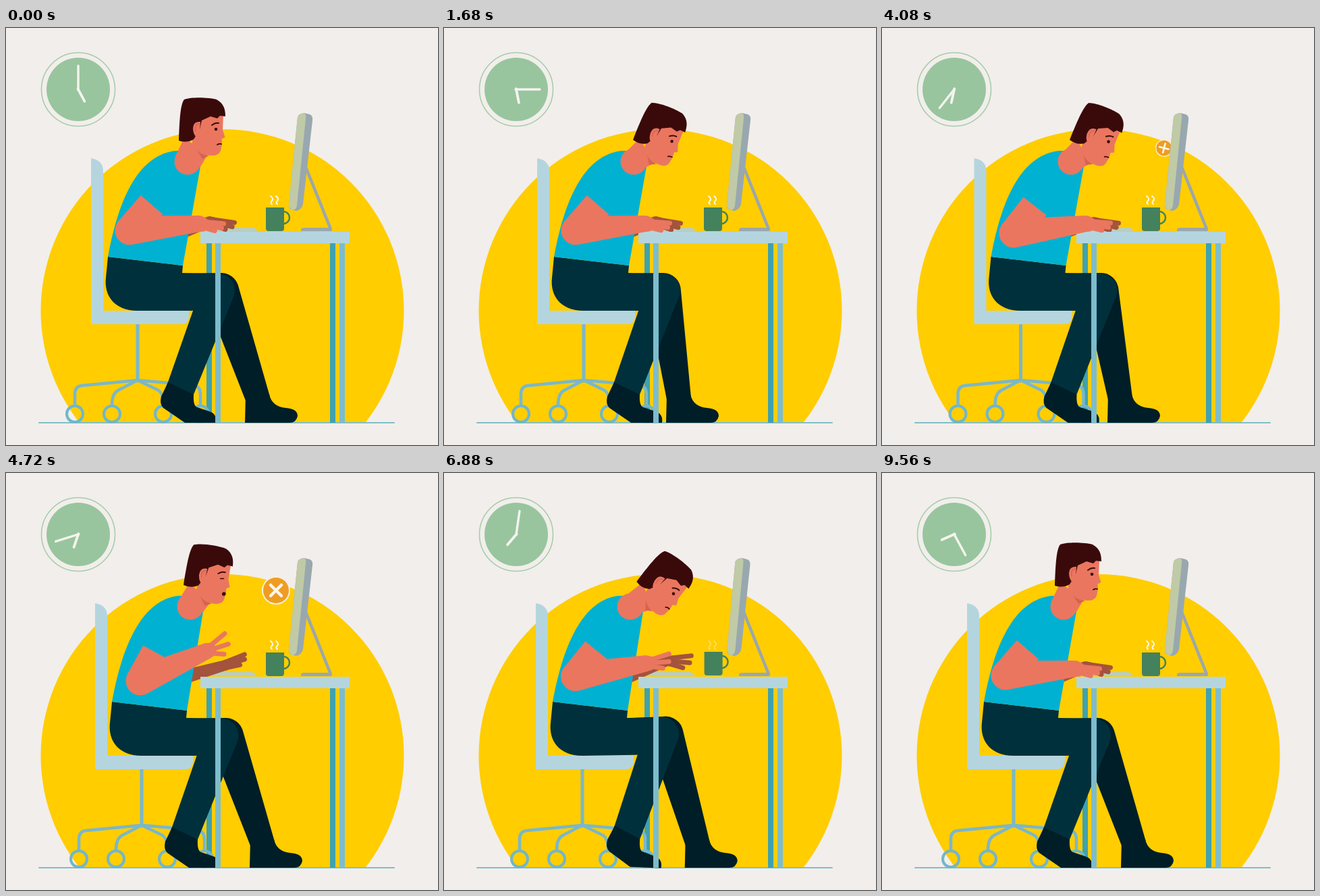
Write an HTML page with a canvas that moves like this. It is 640 by 618 pixels and loops after 9600 ms.

```html
<!DOCTYPE html>
<html lang="en">
<head>
<meta charset="utf-8">
<title>Desk work</title>
<style>
  html, body { margin: 0; width: 100%; height: 100%; overflow: hidden; background: #f2eeeb; }
  canvas { display: block; width: 640px; height: 618px; }
</style>
</head>
<body>
<canvas id="stage" width="640" height="618"></canvas>
<script>
const g = document.getElementById('stage').getContext('2d');
const LOOP = 9600;
const C = {
  bg: '#f2eeeb', sun: '#ffcd00', ink: '#00303c', dark: '#001e27', skin: '#ea7660',
  shade: '#d9624f', brown: '#a4533c', hair: '#3a0a0a', shirt: '#00b1d2', pale: '#b5d5de',
  leg: '#7dbccd', back: '#3fa2ad', green: '#98c59e', cup: '#44815d', grey: '#9aa7ae'
};

// chair, collar, head (x, y, turn), elbow, wrist, hand turn, finger spread,
// rear wrist, rear hand turn, far foot, near heel lift, typing, banging, open mouth
const KEYS = ['chair', 'collar', 'hx', 'hy', 'turn', 'ex', 'ey', 'wx', 'wy', 'hand', 'spread',
  'bx', 'by', 'bhand', 'foot', 'lift', 'type', 'bang', 'open'];
const pose = (...v) => Object.fromEntries(KEYS.map((k, i) => [k, v[i]]));
const sit   = pose(0, 0, 257, 167, 0, 183, 300, 286, 290, 11, 5, 302, 287, 13, 354, 0, 0, 0, 0);
const lean  = pose(12, 12, 281, 166, 19.5, 195, 300, 298, 290, 11, 5, 314, 287, 13, 329, 0, 1, 0, 0);
const close = pose(10.5, 11, 279, 166, 20, 195, 304, 302, 290, 11, 5, 314, 288, 11, 334, 0, 1, 0, 0);
const shock = pose(6, 4, 264, 166, 7, 199, 308, 297, 264, -18, 22, 321, 286, -17, 361, 0, 0, 0, 1);
const bang  = pose(10, 7, 290, 160, 45, 195, 302, 299, 271, -8, 15, 336, 285, 3, 365, 0, 0, 1, 0);
const calm  = pose(10, 7, 272, 167, 10, 193, 301, 300, 287, 9, 5, 309, 287, 11, 327, 1, 1, 0, 0);
const TIMELINE = [[0, sit], [150, sit], [1000, lean], [2200, lean], [3000, close], [4100, close],
  [4500, shock], [5000, shock], [5450, bang], [6700, bang], [7300, calm], [8500, calm],
  [9300, sit], [LOOP, sit]];
const ICON = [[0, 0], [4000, 0], [4080, .6], [4240, 1.06], [4360, 1], [5900, 1], [5960, .9], [6160, 0], [LOOP, 0]];

const mix = (a, b, u) => a + (b - a) * u;
const ease = u => u * u * (3 - 2 * u);
const rad = d => d * Math.PI / 180;

function span(list, t) {
  let i = 0;
  while (i < list.length - 2 && t >= list[i + 1][0]) i++;
  const [t0, a] = list[i], [t1, b] = list[i + 1];
  return [a, b, (t - t0) / (t1 - t0)];
}

function poseAt(t) {
  const [a, b, u] = span(TIMELINE, t), p = {};
  for (const k of KEYS) p[k] = mix(a[k], b[k], ease(u));
  const tap = Math.sin(t / 55) * p.type, hit = (1 - Math.cos((t - 5960) * Math.PI / 200)) / 2 * p.bang;
  p.hand += tap * 2;
  p.bhand -= tap * 2;
  p.wy += hit * 15;
  p.by -= hit * 14;
  p.turn -= hit * 4;
  p.jolt = Math.sin((t - 5910) * Math.PI / 100) * p.bang;
  return p;
}

function fill(d, color) {
  g.fillStyle = color;
  g.fill(new Path2D(d));
}
function line(d, color, w) {
  g.strokeStyle = color;
  g.lineWidth = w;
  g.stroke(new Path2D(d));
}
function disc(x, y, r, color) {
  g.fillStyle = color;
  g.beginPath();
  g.arc(x, y, r, 0, 7);
  g.fill();
}
function ring(x, y, r, color, w) {
  g.strokeStyle = color;
  g.lineWidth = w;
  g.beginPath();
  g.arc(x, y, r, 0, 7);
  g.stroke();
}
function box(x, y, w, h, color) {
  g.fillStyle = color;
  g.fillRect(x, y, w, h);
}
function at(x, y, deg, draw) {
  g.save();
  g.translate(x, y);
  g.rotate(rad(deg));
  draw();
  g.restore();
}
// Rounded limb that narrows from r1 to r2
function limb(x1, y1, r1, x2, y2, r2, color) {
  const a = Math.atan2(y2 - y1, x2 - x1), s = Math.acos((r1 - r2) / Math.hypot(x2 - x1, y2 - y1));
  g.fillStyle = color;
  g.beginPath();
  g.arc(x1, y1, r1, a + s, a - s + 2 * Math.PI);
  g.arc(x2, y2, r2, a - s, a + s);
  g.fill();
}

function clock(t) {
  ring(107, 91, 54.5, '#a6cdab', 1.6);
  disc(107, 91, 47, C.green);
  const arm = (deg, len, w) => at(107, 91, deg, () => line(`M0 1V${-len}`, '#f5f4ee', w));
  arm(t * .0535, 35, 3.4);
  arm(152 + t * .0099, 20, 3.8);
}

function chair(dx) {
  at(dx, 0, 0, () => {
    const post = '#7ab7ca';
    line('M195 438V523', post, 5);
    line('M195 522L112 530Q102 531 102 543V558M195 522L166 537Q157 542 157 558M195 522L226 537Q233 542 233 558M195 522L276 529Q288 530 288 543V560', post, 4.5);
    for (const x of [102, 157, 233, 288]) ring(x, 572, 12, '#71b6cb', 4);
    fill('M126 193Q144 196 144 212V419H271V428Q270 439 260 439H126Z', C.pale);
  });
}

function legs(p) {
  const c = p.chair, l = p.lift, f = p.foot;
  const kx = 314 + c * .9, ky = 389 - 10 * l, fx = kx + Math.max(0, f - 329) * .2;
  const ax = 259 + c + 12 * l, ay = 534 - 7 * l;
  fill(`M${250 + c} 364L${fx} ${ky - 26}V${ky + 20}H${250 + c}Z`, C.dark);
  limb(fx, ky, 26, f + 19, 549, 18, C.dark);
  at(f, 585, 0, () =>
    fill('M1 -42L36 -42Q40 -24 60 -22Q78 -21 78 -10Q76 0 66 0H0Z', C.dark));
  fill(`M${151 + c} 339L${262 + c} 352L${261 + c} 363L${kx} ${ky - 25}V${ky + 25}L${275 + c} ${419 - 6 * l}L${195 + c} 419C${160 + c} 419 ${145 + c} 396 ${148 + c} 370Z`, C.ink);
  limb(kx, ky, 25, ax, ay, 21, C.ink);
  at(ax, ay, 10 * l, () =>
    fill('M-19 -9L19 9Q18 26 24 28L42 34Q54 38 52 51H6L-26 29Q-32 23 -29 12Z', C.dark));
}

function hand(x, y, deg, spread, r, color) {
  at(x, y, deg, () => {
    disc(4, 0, r, color);
    [[-1, 33], [0, 31], [1, 22]].forEach(([k, len]) =>
      at(3, k * 4, k * spread, () => line(`M0 0H${len}`, color, 7)));
  });
}

function rearArm(p) {
  limb(266 + p.chair, 300, 10, p.bx, p.by, 8, C.brown);
  hand(p.bx, p.by, p.bhand, 5 + p.bang * 8, 8, C.brown);
}

function shirt(p) {
  const c = p.chair, n = p.collar;
  fill(`M${252 + n} 182C${200 + c} 187 ${168 + c} 245 ${151 + c} 339L${262 + c} 352L${288 + n} 205L${270 + n} 182Z`, C.shirt);
}

function frontArm(p) {
  const mx = 216 + p.chair, my = 262 + (p.ey - 300) * .5;
  g.lineCap = 'butt';
  line(`M${mx} ${my}L${p.ex} ${p.ey}`, C.skin, 43);
  g.lineCap = 'round';
  limb(p.ex, p.ey, 21.5, p.wx, p.wy, 12, C.skin);
  hand(p.wx, p.wy, p.hand, p.spread, 11, C.skin);
}

function head(p) {
  const a = rad(p.turn), n = p.collar;
  const spot = (x, y) => `${p.hx + x * Math.cos(a) - y * Math.sin(a)} ${p.hy + x * Math.sin(a) + y * Math.cos(a)}`;
  disc(269 + n, 198, 19.5, C.skin);
  fill(`M${spot(7, -4)}L${250.5 + n} 191L${269 + n} 212L${288 + n} 206L${spot(42, 20)}Z`, C.skin);
  at(p.hx, p.hy, p.turn, () => {
    g.translate(-257, -167);
    fill('M276 128H322L321 151L324.5 162L319.5 164.5L320 172L318 182Q315 190 303 189Q289 188 276 172Z', C.skin);
    fill('M283 181Q290 189 301 189L291 194Q287 188 283 181Z', C.shade);
    fill('M256 167C257 140 258 113 264 106C276 102 300 103 312 106C323 112 325 121 325 131L317 130L313 134L303 131L290 137L287 150L278 165Q268 171 256 167Z', C.hair);
    fill('M288 139Q277 138 277 150Q278 162 286 163Z', C.skin);
    line('M286 142Q279 143 281 153', C.shade, 1.4);
    line('M305 144Q310 140 315 141', C.hair, 2);
    if (p.open > .5) {
      line('M309 151L314 150.500', C.hair, 1.4);
      disc(317, 173, 2.8, C.hair);
    } else {
      disc(311, 150, 2.3, C.hair);
      line('M313 173Q316 171 319 172', C.hair, 1.8);
    }
  });
}

function icon(t) {
  const [a, b, u] = span(ICON, t), s = mix(a, b, u), k = 1 - s;
  if (s <= .01) return;
  at(400 + k * 45, 174 + k * 10, k * 150, () => {
    g.scale(s, s);
    disc(0, 0, 21, '#f7efe0');
    disc(0, 0, 19, '#ee9d22');
    line('M-8 -8L8 8M8 -8L-8 8', '#fbf5ea', 4.5);
  });
}

function monitor(jolt) {
  line('M444 206L481 298', C.grey, 4.5);
  fill('M437 301V298Q438 296 442 296H478L483 301Z', C.grey);
  at(445, 215, jolt * .7, () => {
    g.translate(-445, -215);
    fill('M432 132Q433 127 442 126L450 128Q455 130 454 137L440 261Q438 269 430 271L422 269Q418 267 419 261Z', '#98a8ae');
    fill('M432 132Q433 127 442 126Q445 128 444 134L431 263Q430 270 424 270Q418 267 419 261Z', '#c0caa6');
  });
}

function mug(p) {
  at(Math.abs(p.jolt) * 1, -Math.abs(p.jolt) * 1.5, 0, () => {
    ring(411, 281, 9, C.cup, 2.5);
    fill('M385 266H412V297Q412 301 408 301H389Q385 301 385 297Z', C.cup);
  });
  g.globalAlpha = 1 - .8 * p.bang;
  line('M392 249q5 4 2 7t0 5M400 249q5 4 2 7t0 5', '#fdf9ee', 2);
  g.globalAlpha = 1;
}

function draw(t) {
  const p = poseAt(t);
  g.lineCap = g.lineJoin = 'round';
  box(0, 0, 640, 618, C.bg);
  g.save();
  g.beginPath();
  g.rect(0, 0, 640, 585);
  g.clip();
  disc(320.5, 419, 269, C.sun);
  g.restore();
  clock(t);
  line('M49 585H575', '#7fbfc6', 2);
  box(297, 319, 8, 266, C.back);
  box(480, 319, 8, 266, C.back);
  chair(p.chair);
  legs(p);
  icon(t);
  monitor(p.jolt);
  mug(p);
  fill('M290 301Q292 295 300 295H364Q370 296 372 301Z', '#b9cec0');
  rearArm(p);
  shirt(p);
  box(310, 319, 8, 266, C.leg);
  box(494, 319, 8, 266, C.leg);
  box(288, 302, 221, 17, C.pale);
  frontArm(p);
  head(p);
}

const start = performance.now();
function tick() {
  draw((performance.now() - start) % LOOP);
  requestAnimationFrame(tick);
}
tick();
</script>
</body>
</html>
```
